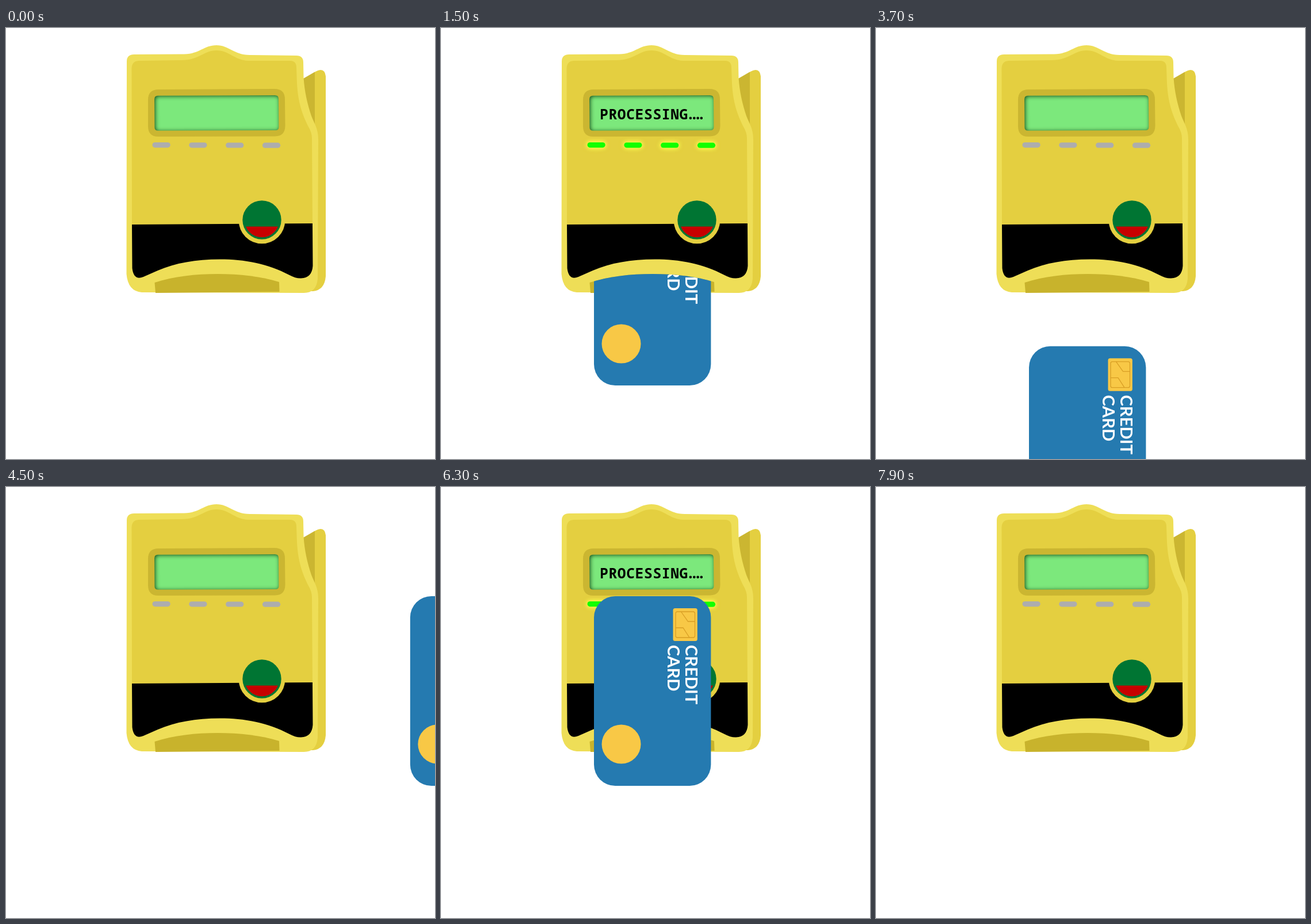
Recreate the animation shown at these times as an HTML page with a canvas. Size 746 by 750 pixels, loop 8 s.

```html
<!DOCTYPE html>
<html lang="en">
<head>
<meta charset="utf-8">
<title>Card reader</title>
<style>
  html, body { margin: 0; width: 100%; height: 100%; overflow: hidden; background: #fff; }
  canvas { display: block; width: 746px; height: 750px; }
</style>
</head>
<body>
<canvas id="stage" width="746" height="750"></canvas>
<script>
const ctx = document.getElementById('stage').getContext('2d');
const LOOP = 8000, STEP = 100;
const LIGHT = '#eede57', YELLOW = '#e4cf40', DARK = '#cbb631', SLOT = '#c8b32c';
const GOLD = '#f8c846';

const OUTER = new Path2D(`M210 58 Q210 46 223 46 L310 45.5
  C337 45 344 30 366 30 C388 30 396 47 424 47 L505 48 Q517 48 517 60 L517.5 86
  C519 110 524 132 531 153 C536 166 543 175 543 194 L542 436
  Q540 461 518 461 L236 460 Q212 458 209.5 428 Z`);
const FACE = new Path2D(`M218.5 70 Q219 57 232 57 L305 56
  C337 56 343 39 366 39 C389 39 396 56 422 57 L494 57 Q505 57 505 69 L506 97
  C508 130 515 150 526 172 Q532 182 532 192 L533 342 L219 343 Z`);
const BAND = new Path2D(`M219 342 L533 340 L533.5 414 Q532 435 513 435.5
  Q504 436 493 430 C455 410 415 402.5 372 402.5 C330 402.5 294 409 264 422
  L239 433 Q222 440 219.5 418 Z`);
const ARCH = 'M258.5 443 C292 432 330 428 368 428 C406 428 442 432 475 442';
const SLOT_SHAPE = new Path2D(ARCH + ' L475.5 459 L260 461 Z');
const BELOW_ARCH = new Path2D(ARCH + ' L475 750 L258.5 750 Z');
const ARM = new Path2D(`M518 88 L538 76 Q554 67 556 84 L556 432
  Q554 456 534 458 L518 458 Z`);
const ARM_SHADE = new Path2D('M510 92 L537 76.5 L537 170 L510 170 Z');
const SCREEN = new Path2D(`M264 117.7 L468 117 Q474 117 474 123 L474.5 172
  Q474.5 178 469 178 L264 178.7 Q258.3 178.7 258.3 173 L258 124 Q258 117.7 264 117.7 Z`);
const BEZEL = new Path2D(`M265 107 L467 106 Q485 106 485 124 L485.5 170
  Q485.5 188 468 188.5 L265 189 Q247 189 247 171 L247 125 Q247 107 265 107 Z`);

function fill(path, color) {
  ctx.fillStyle = color;
  ctx.fill(path);
}

function disc(x, y, r, color) {
  ctx.beginPath();
  ctx.arc(x, y, r, 0, Math.PI * 2);
  ctx.fillStyle = color;
  ctx.fill();
}

function box(x, y, w, h, r, color) {
  ctx.beginPath();
  ctx.roundRect(x, y, w, h, r);
  ctx.fillStyle = color;
  ctx.fill();
}

function drawScreen(on) {
  fill(BEZEL, DARK);
  fill(SCREEN, '#7ce87c');

  // inner shadow: a frame outside the screen casts inwards
  ctx.save();
  ctx.clip(SCREEN);
  const frame = new Path2D();
  frame.rect(200, 60, 330, 180);
  frame.addPath(SCREEN);
  ctx.shadowColor = 'rgba(0, 40, 0, .8)';
  ctx.shadowBlur = 7;
  ctx.shadowOffsetX = 1.5;
  ctx.shadowOffsetY = 1;
  ctx.fillStyle = DARK;
  ctx.fill(frame, 'evenodd');
  ctx.restore();

  if (!on) return;
  ctx.fillStyle = '#000';
  ctx.font = '600 24.5px "Noto Sans Mono", monospace';
  ctx.letterSpacing = '0.7px';
  ctx.fillText('PROCESSING', 276, 158.5);
  ctx.letterSpacing = '-8.4px';
  ctx.fillText('....', 426.6, 158.5);
  ctx.letterSpacing = '0px';
}

function drawLights(on) {
  ctx.save();
  if (on) {
    ctx.shadowColor = '#ffff50';
    ctx.shadowBlur = 9;
  }
  for (let i = 0; i < 4; i++) {
    const x = 254.5 + i * 63.8, y = 199 + i * 0.2;
    if (on) box(x, y, 31.2, 9.2, 4.6, '#ffff50');
    box(x, y, 31.2, 9.2, 4.6, on ? '#12ff00' : '#adadad');
  }
  ctx.restore();
}

function drawButton() {
  disc(445, 335, 40.3, YELLOW);
  disc(445, 334, 33.7, '#007533');
  const a = Math.asin(11.5 / 30.3);
  ctx.beginPath();
  ctx.arc(445, 334, 30.3, a, Math.PI - a);
  ctx.closePath();
  ctx.fillStyle = '#c80000';
  ctx.fill();
}

function drawReader(on) {
  fill(ARM, YELLOW);
  fill(ARM_SHADE, DARK);
  fill(OUTER, LIGHT);
  fill(FACE, YELLOW);
  fill(BAND, '#000');
  fill(SLOT_SHAPE, SLOT);
  drawScreen(on);
  drawLights(on);
  drawButton();
}

function drawChip() {
  box(137.5, 21, 42.3, 57, 3.5, GOLD);
  ctx.beginPath();
  ctx.roundRect(142, 27, 33.5, 45, 3);
  ctx.moveTo(151.5, 27);
  ctx.lineTo(163.5, 44);
  ctx.lineTo(175.5, 44);
  ctx.moveTo(142, 55);
  ctx.lineTo(155, 55);
  ctx.lineTo(166, 72);
  ctx.strokeStyle = '#d99f25';
  ctx.lineWidth = 1.3;
  ctx.stroke();
}

function cardLabel(text, x) {
  ctx.save();
  ctx.translate(x, 84.7);
  ctx.rotate(Math.PI / 2);
  ctx.font = '700 29.3px Lato, sans-serif';
  ctx.fillStyle = '#fff';
  ctx.fillText(text, 0, 0);
  ctx.restore();
}

function drawCard({ x, y, inSlot }) {
  ctx.save();
  if (inSlot) ctx.clip(BELOW_ARCH);
  ctx.translate(x, y);
  box(0, 0, 203.4, 330, 37, '#257ab0');
  drawChip();
  cardLabel('CREDIT', 158.7);
  cardLabel('CARD', 127.7);
  disc(47.5, 257.5, 34, GOLD);
  ctx.restore();
}

function slide(t, start, end, from, to) {
  const k = Math.min(1, Math.max(0, (t - start) / (end - start)));
  return from + (to - from) * k;
}

function cardAt(t) {
  if (t < 4400) {
    const y = t < 2900 ? slide(t, 0, 1500, 750, 292) : slide(t, 2900, 4300, 292, 750);
    return { x: 266, y, inSlot: true };
  }
  const x = t < 6700 ? slide(t, 4400, 5500, 746.5, 266) : slide(t, 6700, 7900, 266, -204);
  return { x, y: 190, inSlot: false };
}

function isBusy(t) {
  return (t >= 1500 && t < 3000) || (t >= 5500 && t < 6800);
}

function render(t) {
  ctx.fillStyle = '#fff';
  ctx.fillRect(0, 0, 746, 750);
  drawReader(isBusy(t));
  drawCard(cardAt(t));
}

const began = performance.now();
function tick() {
  const t = (performance.now() - began) % LOOP;
  render(Math.floor(t / STEP) * STEP);
  requestAnimationFrame(tick);
}
tick();
</script>
</body>
</html>
```
